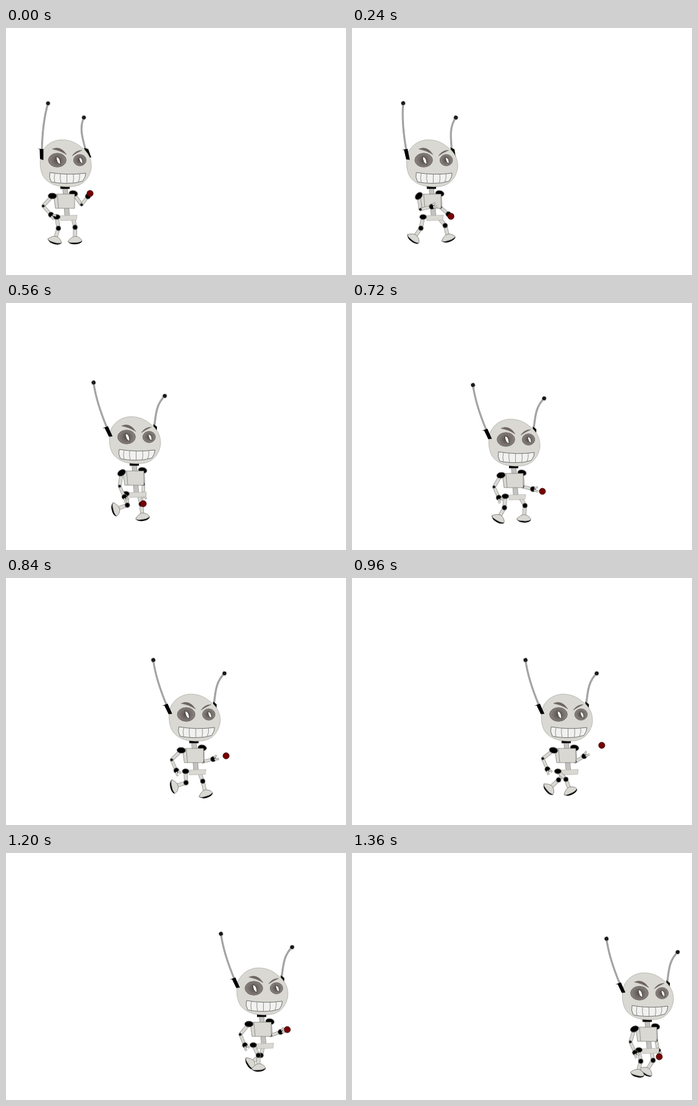
Animation, 550 px wide and 400 px high, one loop 1400 ms. Source, as an HTML page with a canvas:

```html
<!DOCTYPE html>
<html lang="en">
<head>
<meta charset="utf-8">
<title>Walking robot</title>
<style>
html, body { margin: 0; width: 100%; height: 100%; overflow: hidden; background: #fff; }
canvas { display: block; }
</style>
</head>
<body>
<canvas id="stage" width="550" height="400"></canvas>
<script>
const ctx = document.getElementById('stage').getContext('2d');
const LOOP = 1400, STEP = 40;
const METAL = '#d9d8d2', EDGE = '#7f7e7c', TUBE = '#c3c2be', BROW = '#6d6461';

// Key points: time, then value(s).
const DRIFT = [[0, 0, 0], [240, 33, 0], [560, 112, 3], [720, 166, 7], [960, 251, 7],
  [1120, 291, 5], [1200, 318, 5], [1360, 382, 13]];
const BALL = [[0, 136, 268], [240, 160, 305], [560, 222, 325], [720, 308, 305], [960, 404, 271],
  [1200, 455, 286], [1360, 497, 330]];
const GAIT = [[0, 150], [240, 150], [560, 255], [720, 490], [960, 720], [1200, 788], [1360, 820]];

// Angles in degrees: thigh = lean + reach * cos, knee = bend + lift while the leg swings.
const NEAR_LEG = { lean: 15, reach: 30, bend: 25, lift: 55, thigh: 18.5, shin: 20 };
const FAR_LEG = { lean: 3, reach: 42, bend: 8, lift: 35, thigh: 14, shin: 21 };

const mix = (a, b, u) => a + (b - a) * u;
const rad = deg => deg * Math.PI / 180;
const cos = deg => Math.cos(rad(deg));
const sin = deg => Math.sin(rad(deg));
function ease(u) {
  u = Math.min(1, u);
  return u * u * (3 - 2 * u);
}
function along(keys, t) {
  let i = 0;
  while (i < keys.length - 2 && t >= keys[i + 1][0]) i++;
  const [a, b] = [keys[i], keys[i + 1]];
  return a.slice(1).map((v, k) => mix(v, b[k + 1], (t - a[0]) / (b[0] - a[0])));
}
// Angle 0 hangs straight down, positive angles point forward.
const reach = ([x, y], length, angle) => [x + length * sin(angle), y + length * cos(angle)];

function shape(d, fill, stroke, width = 0.8) {
  const path = new Path2D(d);
  if (fill) { ctx.fillStyle = fill; ctx.fill(path); }
  if (stroke) { ctx.strokeStyle = stroke; ctx.lineWidth = width; ctx.stroke(path); }
}
function oval([x, y], rx, ry, fill, stroke, angle = 0) {
  ctx.beginPath();
  ctx.ellipse(x, y, rx, ry, rad(angle), 0, 7);
  ctx.fillStyle = fill;
  ctx.fill();
  if (stroke) { ctx.strokeStyle = stroke; ctx.lineWidth = 1; ctx.stroke(); }
}
const knob = (p, r) => oval(p, r, r, '#000', '#777');

function rod(a, b, width, color = METAL) {
  for (const [w, c] of [[width + 1.2, EDGE], [width, color]]) {
    ctx.beginPath();
    ctx.moveTo(...a);
    ctx.lineTo(...b);
    ctx.lineWidth = w;
    ctx.strokeStyle = c;
    ctx.stroke();
  }
}
function turned([x, y], angle, draw) {
  ctx.save();
  ctx.translate(x, y);
  ctx.rotate(rad(angle));
  draw();
  ctx.restore();
}

function drawArm(shoulder, elbow, lower, length, shoulderTilt) {
  const hand = reach(elbow, length, lower);
  rod(shoulder, elbow, 4.5);
  rod(elbow, hand, 4);
  knob(elbow, 2.2);
  oval(shoulder, 7, 4.8, '#000', '#777', shoulderTilt);
  knob(hand, 4.3);
  turned(hand, 90 - lower, () => {
    rod([2, -2], [7, -5], 1.8);
    rod([2, 1], [9, 2], 2.2);
  });
}
function drawLeg(leg, hip, phase, strength) {
  const thigh = leg.lean + leg.reach * strength * cos(phase);
  const shin = thigh - leg.bend - leg.lift * strength * Math.max(0, -sin(phase));
  const knee = reach(hip, leg.thigh, thigh), foot = reach(knee, leg.shin, shin);
  rod(hip, knee, 5);
  rod(knee, foot, 5);
  if (leg === NEAR_LEG) oval(hip, 5.5, 4.1, '#000', '#777');
  knob(knee, 3.9);
  turned(foot, -1.1 * shin, () => {
    shape('M-11.5 2Q-8 7 0 6.5Q8 6.5 11.5 2L11 0L-10 0Z', '#000');
    shape('M-11.5 2Q-6 -6 1 -6.5Q9 -5 11.5 1Q6 4.5 -2 4Q-9 4.5 -11.5 2Z', METAL, EDGE);
  });
}
function drawAntenna(pivot, angle, curve, tip, base) {
  turned(pivot, angle, () => {
    shape(curve, null, '#777', 2.8);
    shape(curve, null, '#bbb', 1.3);
    shape(base, '#000');
    oval(tip, 3.2, 3.2, '#000', '#888');
    oval(tip, 0.8, 0.8, '#667');
  });
}
function drawEye([x, y], rx, ry) {
  const shade = ctx.createRadialGradient(x, y, 1, x, y, rx);
  shade.addColorStop(0, '#554e4b');
  shade.addColorStop(0.5, '#766e6a');
  shade.addColorStop(1, '#8b8480');
  oval([x, y], rx, ry, shade, '#716a67');
  ctx.save();
  ctx.translate(x + 1.8, y + 0.5);
  ctx.scale(ry / 11.5, ry / 11.5);
  shape('M-3.8 -6.5Q4 -5 3.2 7Q-3.5 4 -3.8 -6.5Z', '#fff', '#333', 0.9);
  ctx.restore();
}
function drawHead() {
  shape('M90 181C105 181 115 187 123 194C133 201 139 213 138 226'
    + 'C136 242 125 257 104 257C88 258 73 255 63 244C54 234 54 213 57 204C62 190 76 181 90 181Z',
    METAL, '#9a9a96', 0.6);
  drawEye([83, 214], 14.3, 11.2);
  drawEye([119.5, 214], 10.2, 9.2);
  shape('M75 196Q88 190 98 205Q87 198 75 196Z', BROW, BROW, 0.6);
  shape('M107 207Q113 198 123 198Q114 202 107 207Z', BROW, BROW, 0.6);
  shape('M71 234Q100 239 129 235Q129 242 124 248Q112 252 98 251.5Q82 251.5 73 249Q69 242 71 234Z',
    '#f1f1ef', '#707070', 1);
  shape('M79 235.5Q77 243 79 250M88 236.5Q87 244 89 251M98.5 237V251.5'
    + 'M109 237Q110 244 108.5 251M119 236Q120 243 117 250', null, '#888', 0.9);
}
function drawBody() {
  rod([95.5, 259], [99, 306], 7, TUBE);
  shape('M88 256H103V260.5H88Z', '#000');
  shape('M87 304L115 303L114 311L88 312Z', METAL, '#a9a9a5', 0.6);
  shape('M77 269.5L83 269H111V292H80Z', METAL, EDGE);
  shape('M83 269L85 292', null, EDGE);
}

function draw(t) {
  const start = ease(t / 240), sweep = ease(t / 500), strength = mix(0.25, 1, start);
  const [dx, dy] = along(DRIFT, t), [bx, by] = along(BALL, t), [phase] = along(GAIT, t);

  // The far forearm always points at the ball.
  const farShoulder = [109, 268];
  const farElbow = reach(farShoulder, 22.5, mix(36, 3, start));
  const aim = Math.atan2(bx - dx - farElbow[0], by - dy - farElbow[1]) * 180 / Math.PI;

  // The near arm swings slowly and lifts its forearm once, early on.
  const nearShoulder = [75, 272];
  const upper = -22 + 31 * cos((t - 320) / 1350 * 360) - 23 * (1 - start);
  const lower = 24 + 85 * Math.exp(-(((t - 200) / 160) ** 2));

  ctx.clearRect(0, 0, 550, 400);
  ctx.save();
  ctx.translate(dx, dy);
  drawAntenna([131 - 4 * sweep, 205], 22 * sweep, 'M-2 -6C-5 -22 -14 -40 -5 -60',
    [-5, -60], 'M-5 -11L2 -9L7 5L2 4Z');
  drawLeg(FAR_LEG, [101 + 9 * cos(phase + 180), 309], phase + 180, strength);
  drawArm(farShoulder, farElbow, aim, 17, 10);
  drawBody();
  drawHead();
  drawAntenna([58, 214], -24 * sweep, 'M0 -15Q1 -62 10 -92',
    [10, -92], 'M-7 -18.6L2.5 -18L2.5 0L-3 -2L-3.5 -17.5Z');
  drawLeg(NEAR_LEG, [82, 306], phase, strength);
  drawArm(nearShoulder, reach(nearShoulder, 22, upper), lower, 19, -40 - upper);
  ctx.restore();
  oval([bx, by], 5, 5, '#780000', '#3c0808');
}

function frame() {
  const t = performance.now() % LOOP;
  draw(Math.floor(t / STEP) * STEP);
  requestAnimationFrame(frame);
}
frame();
</script>
</body>
</html>
```
